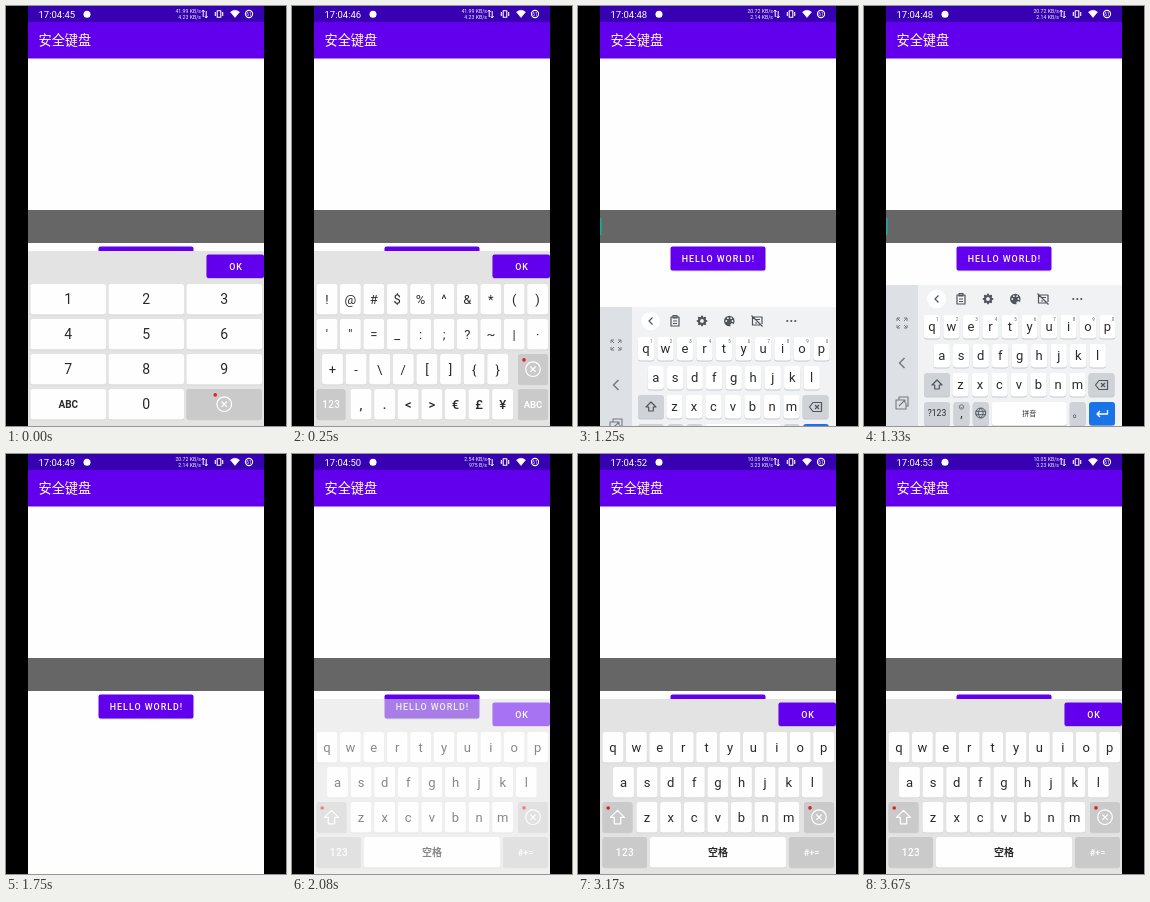
Write an HTML page with a canvas that moves like this. It is 280 px wide and 420 px high and loops after 3910 ms.

```html
<!DOCTYPE html>
<html lang="zh">
<head>
<meta charset="utf-8">
<title>安全键盘</title>
<style>
  html, body { margin: 0; width: 100%; height: 100%; overflow: hidden; background: #000; }
  canvas { display: block; width: 280px; height: 420px; }
</style>
</head>
<body>
<canvas id="stage" width="280" height="420"></canvas>
<script>
const LOOP = 3910;
const PURPLE = '#6200ee', INK = '#292929', ICON = '#50555b';
const SANS = 'Roboto, "Noto Sans CJK SC", "Noto Sans CJK", sans-serif';
const screen = document.getElementById('stage').getContext('2d');
const layer = document.createElement('canvas');
layer.width = 280;
layer.height = 420;
const layerCtx = layer.getContext('2d');
let g = screen;

// Each timeline is a list of [start time, value] steps.
const clock = [[0, 45], [80, 46], [670, 47], [1170, 48], [1670, 49], [2080, 50], [2580, 51], [3170, 52], [3670, 53]];
const traffic = [
  [0, ['41.99 KB/s', '4.23 KB/s']], [830, ['20.72 KB/s', '2.14 KB/s']],
  [1920, ['2.54 KB/s', '975 B/s']], [2920, ['10.05 KB/s', '3.23 KB/s']]
];
const layout = [[0, 'digits'], [80, 'letters'], [250, 'symbols'], [1000, 'letters']];
const padAlpha = [[0, 1], [830, 0.035], [920, 0], [1920, 0.06], [2000, 0.3], [2080, 0.55], [2170, 1]];
const imeOffset = [[0, 141], [1170, 95], [1250, 22], [1330, 0], [1670, 70], [1750, 141]];
const at = (steps, t) => steps.reduce((value, [start, next]) => t >= start ? next : value, null);

function box(x, y, w, h, color, r = 0) {
  g.fillStyle = color;
  g.beginPath();
  g.roundRect(x, y, w, h, r);
  g.fill();
}

function label(s, x, y, size, color = INK, { weight = 400, align = 'center', spacing = 0 } = {}) {
  g.font = `${weight} ${size}px ${SANS}`;
  g.textAlign = align;
  g.textBaseline = 'alphabetic';
  g.letterSpacing = spacing + 'px';
  g.fillStyle = color;
  g.fillText(s, x + (align === 'center' ? spacing / 2 : 0), y);
  g.letterSpacing = '0px';
}

function dot(x, y, r, color) {
  g.fillStyle = color;
  g.beginPath();
  g.arc(x, y, r, 0, 7);
  g.fill();
}

function ring(x, y, r, color, width = 1) {
  g.strokeStyle = color;
  g.lineWidth = width;
  g.beginPath();
  g.arc(x, y, r, 0, 7);
  g.stroke();
}

function line(path, x, y, color = ICON, width = 1.2, fill) {
  const shape = new Path2D(path);
  g.save();
  g.translate(x, y);
  if (fill) {
    g.fillStyle = fill;
    g.fill(shape);
  }
  g.strokeStyle = color;
  g.lineWidth = width;
  g.lineJoin = 'round';
  g.stroke(shape);
  g.restore();
}

function statusBar(t) {
  box(22, 0, 236, 16, '#3700b3');
  label('17:04:' + at(clock, t), 32.5, 11.5, 9.5, '#fff', { align: 'left' });
  dot(81, 8.2, 3.5, '#fff');
  at(traffic, t).forEach((s, i) => label(s, 195, 6.8 + i * 6, 5.2, '#eee', { align: 'right' }));
  line('M-1.6 3V-4M-3 -2.3L-1.6 -4L-.2 -2.3M1.4 -3V4M0 2.3L1.4 4L2.8 2.3', 198.8, 8, '#fff', 1);
  line('M-1.8 -3.3H1.8V3.3H-1.8ZM-3.7 -2V2M3.7 -2V2', 213, 8, '#fff', 1.1);
  line('M-4.5 -2Q0 -5.5 4.5 -2L0 3.5Z', 229, 8, '#fff', 0.6, '#fff');
  ring(243, 8, 3.6, '#fff', 1.1);
  label('61', 243, 9.8, 4.8, '#fff');
}

function page(t) {
  box(0, 0, 280, 420, '#000');
  box(22, 0, 236, 420, '#fefefe');
  statusBar(t);
  box(22, 16, 236, 36.5, PURPLE);
  label('安全键盘', 32.5, 39, 13.2, '#fff', { weight: 500, align: 'left' });
  box(22, 204, 236, 33, '#666');
  if (t >= 1250 && t < 1750) box(22, 212, 1.6, 17, '#20a99b');
  box(93, 241.5, 94, 24, 'rgba(0,0,0,.16)', 2);
  box(92.5, 240.5, 95, 24, PURPLE, 2);
  label('HELLO WORLD!', 140, 256, 8.9, '#fff', { weight: 500, spacing: 1 });
}

// Secure keyboard
const rowY = i => 278 + 35 * i;

function key(x, w, row, s, { gray = false, size = 13, weight = 400, spacing = 0 } = {}) {
  const y = rowY(row);
  box(x, y + 0.7, w, 30.5, '#cfcfcf', 2.5);
  box(x, y, w, 30.5, gray ? '#cacaca' : '#fefefe', 2.5);
  if (s) label(s, x + w / 2, y + 15.3 + size * 0.36, size, gray ? '#fff' : INK, { weight, spacing });
}

function keyRow(chars, row, first, pitch, weight = 400) {
  [...chars].forEach((c, i) => key(first + i * pitch - 10.4, 20.8, row, c, { weight }));
}

function deleteKey(x, w, row) {
  key(x, w, row, '', { gray: true });
  const cx = x + w / 2, cy = rowY(row) + 15.2;
  ring(cx, cy, 7.3, '#fff', 1.2);
  line('M-2.7 -2.7L2.7 2.7M2.7 -2.7L-2.7 2.7', cx, cy, '#fff');
  dot(cx - 9, cy - 9.3, 1.8, '#e51c23');
}

const pads = {
  digits() {
    for (let i = 0; i < 9; i++) {
      key(24.5 + 78 * (i % 3), 75.5, Math.floor(i / 3), String(i + 1), { size: 14 });
    }
    key(24.5, 75.5, 3, 'ABC', { size: 10, weight: 700 });
    key(102.5, 75.5, 3, '0', { size: 14 });
    deleteKey(180.5, 75.5, 3);
  },
  letters() {
    keyRow('qwertyuiop', 0, 35, 23.4);
    keyRow('asdfghjkl', 1, 45.5, 23.6);
    key(24.5, 30, 2, '', { gray: true });
    line('M0 -7L7 0H3.2V6.5H-3.2V0H-7Z', 39.5, 363.3, '#fff', 1.2);
    dot(30.2, 354, 1.8, '#e51c23');
    keyRow('zxcvbnm', 2, 69, 23.6);
    deleteKey(226, 30, 2);
    key(24.5, 44.5, 3, '123', { gray: true, size: 10, weight: 500, spacing: 0.4 });
    key(72, 136, 3, '空格', { size: 10, weight: 700 });
    key(211, 45, 3, '#+=', { gray: true, size: 9, weight: 500 });
  },
  symbols() {
    keyRow('!@#$%^&*()', 0, 35, 23.4);
    keyRow('\'"=_:;?~|·', 1, 35, 23.4);
    keyRow('+-\\/[]{}', 2, 40.5, 23.6);
    deleteKey(226, 30, 2);
    key(24.5, 29, 3, '123', { gray: true, size: 10, weight: 500, spacing: 0.3 });
    keyRow(',.<>€£¥', 3, 69, 23.6, 500);
    key(226, 30, 3, 'ABC', { gray: true, size: 9.5, weight: 700 });
  }
};

function securePad(t) {
  const alpha = at(padAlpha, t);
  if (!alpha) return;
  g = layerCtx;
  g.clearRect(0, 0, 280, 420);
  box(22, 245, 236, 175, '#e3e3e3');
  box(200.5, 249.5, 57.5, 23.5, 'rgba(0,0,0,.14)', 2);
  box(200.5, 248.5, 57.5, 23.5, PURPLE, 2);
  label('OK', 229.5, 264, 8.9, '#fff', { weight: 500, spacing: 0.9 });
  pads[at(layout, t)]();
  g = screen;
  g.globalAlpha = alpha;
  g.drawImage(layer, 0, 0);
  g.globalAlpha = 1;
}

// System keyboard in one-handed mode
function imeKey(cx, w, row, s, { color = '#fff', size = 13, hint } = {}) {
  const y = 309 + 29 * row;
  box(cx - w / 2, y + 0.9, w, 23.5, '#c5c9ce', 3);
  box(cx - w / 2, y, w, 23.5, color, 3);
  if (s) label(s, cx, y + 11.5 + size * 0.33, size, INK);
  if (hint) label(hint, cx + 5.5, y + 5.5, 4.5, '#666');
}

function imeRow(chars, row, first, hints = '') {
  [...chars].forEach((c, i) => imeKey(first + i * 19.5, 16.3, row, c, { hint: hints[i] }));
}

function imeToolbar() {
  dot(72.5, 293, 9.3, '#fff');
  line('M2 -3.5L-1.5 0L2 3.5', 72.5, 293);
  line('M-4 -4H4V5H-4ZM-2 -5.5H2V-3H-2ZM-2 0H2M-2 2.5H2', 97, 293);
  ring(124, 293, 3, ICON, 2.2);
  for (let i = 0; i < 8; i++) {
    const a = i * Math.PI / 4;
    dot(124 + 4.3 * Math.cos(a), 293 + 4.3 * Math.sin(a), 1.1, ICON);
  }
  dot(151.3, 293, 5.3, ICON);
  [[-3, 0], [-1.4, -2.8], [1.8, -2.8], [3.2, 0]].forEach(([x, y]) => dot(151.3 + x, 293 + y, 0.9, '#f0f2f4'));
  dot(154, 297, 1.7, '#f0f2f4');
  line('M-4.5 -4H5V3M3 4H-4.5V-4M-5.5 -5.5L5.5 5.5M-2 -1.5H3M-2 2H0', 179, 293);
  [-4, 0, 4].forEach(x => dot(213.3 + x, 293, 1.1, ICON));
}

function systemKeyboard(t) {
  const offset = at(imeOffset, t);
  if (offset >= 141) return;
  const gray = '#cfd3d8';
  g.save();
  g.beginPath();
  g.rect(22, 279, 236, 141);
  g.clip();
  g.translate(0, offset);
  box(22, 279, 236, 141, '#f0f2f4');
  box(22, 279, 32, 141, '#dde1e6');
  line('M-5 -2V-5H-2M2 -5H5V-2M5 2V5H2M-2 5H-5V2M-5 -5L-2 -2M5 -5L2 -2M5 5L2 2M-5 5L-2 2', 38, 317, '#747a80', 1);
  line('M2.5 -5L-2.5 0L2.5 5', 38, 357, '#747a80', 1.5);
  line('M1 -3H-6V6H4V0M-3 -3V-6H6V3H4M-3 3L3 -3M0 -3H3V0', 38, 397, '#747a80', 1.1);
  imeToolbar();
  imeRow('qwertyuiop', 0, 68, '1234567890');
  imeRow('asdfghjkl', 1, 77.7);
  imeKey(73, 26, 2, '', { color: gray });
  line('M0 -5L5 0H2.3V4H-2.3V0H-5Z', 73, 379);
  imeRow('zxcvbnm', 2, 96.5);
  imeKey(237.5, 26, 2, '', { color: gray });
  line('M-6 0L-2.5 -4.5H6V4.5H-2.5ZM-.5 -2L3.5 2M3.5 -2L-.5 2', 237.5, 379);
  imeKey(73, 26, 3, '?123', { color: gray, size: 8.5 });
  imeKey(97.5, 16, 3, ',', { color: gray, size: 12 });
  ring(97.5, 401, 2.2, ICON, 0.7);
  line('M-1 .2Q0 1.3 1 .2', 97.5, 401, ICON, 0.6);
  imeKey(116.7, 16, 3, '', { color: gray });
  ring(116.7, 407, 5, ICON);
  line('M-5 -1.7H5M-5 1.7H5M0 -5Q-5 0 0 5Q5 0 0 -5', 116.7, 407, ICON, 0.9);
  imeKey(165.3, 75, 3, '拼音', { size: 7 });
  imeKey(213.7, 16, 3, '。', { color: gray, size: 10 });
  imeKey(238, 26, 3, '', { color: '#1a73e8' });
  line('M5.5 -3V1H-5M-2 -2L-5 1L-2 4', 238, 407, '#fff', 1.3);
  g.restore();
}

function draw(now) {
  const t = now % LOOP;
  page(t);
  systemKeyboard(t);
  securePad(t);
}

const start = performance.now();
function tick() {
  draw(performance.now() - start);
  requestAnimationFrame(tick);
}
tick();
</script>
</body>
</html>
```
